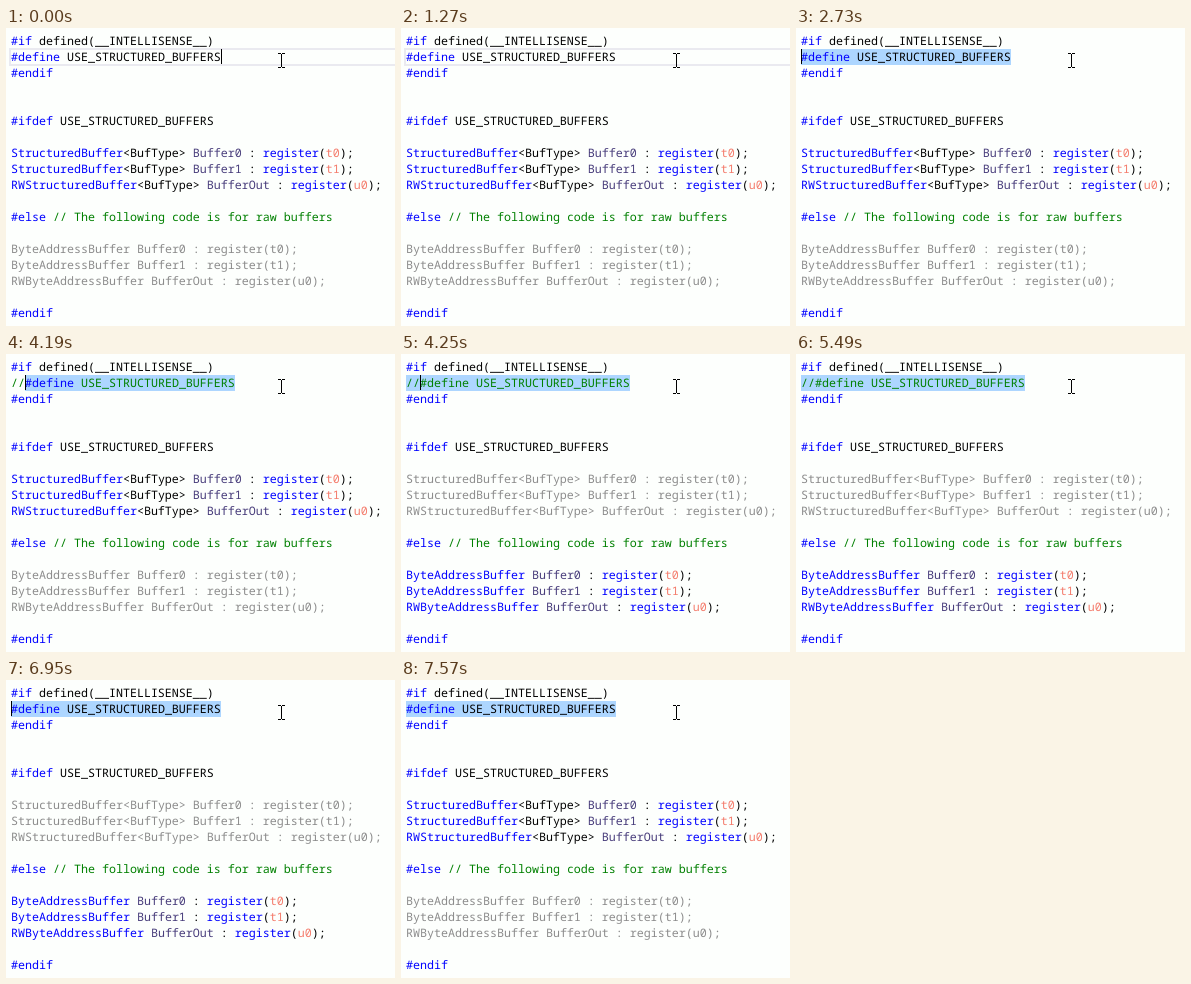
These frames come from a looping animation (389x298 px, 8000 ms). An HTML page:

```html
<!DOCTYPE html>
<html lang="en">
<head>
<meta charset="utf-8">
<title>Preprocessor toggle</title>
<style>
  html, body { margin: 0; width: 100%; height: 100%; overflow: hidden; background: #fdfffd; }
  svg { display: block; width: 389px; height: 298px; }
  text {
    font: 11.667px "Noto Sans Mono", "DejaVu Sans Mono", monospace;
    white-space: pre;
    text-rendering: geometricPrecision;
  }
  .keyword { fill: #0000ff; }
  .variable { fill: #483d7b; }
  .slot { fill: #f47c6c; }
  .comment { fill: #008000; }
  .inactive, .inactive tspan { fill: #8c8c8c; }
</style>
</head>
<body>
<svg id="stage" viewBox="0 0 389 298">
  <rect id="currentLine" x="4" y="21" width="400" height="16" fill="none" stroke="#eaeaf0" stroke-width="2"/>
  <rect id="selection" y="21" height="16" fill="#add6ff"/>
  <g id="code"></g>
  <rect id="caret" y="21" width="1" height="15" fill="#000"/>
  <path d="M272 25.5h3M276 25.5h3M275.5 26v13M272 39.5h3M276 39.5h3" fill="none" stroke="#000"/>
</svg>
<script>
const LOOP = 8000, LEFT = 5, CHAR = 7, LINE = 16, BASELINE = 17;
const DEFINE = "#define USE_STRUCTURED_BUFFERS";
const DEFINE_ROW = 1;

const source = [
  "#if defined(__INTELLISENSE__)",
  DEFINE,
  "#endif",
  "", "",
  "#ifdef USE_STRUCTURED_BUFFERS",
  "",
  "StructuredBuffer<BufType> Buffer0 : register(t0);",
  "StructuredBuffer<BufType> Buffer1 : register(t1);",
  "RWStructuredBuffer<BufType> BufferOut : register(u0);",
  "",
  "#else // The following code is for raw buffers",
  "",
  "ByteAddressBuffer Buffer0 : register(t0);",
  "ByteAddressBuffer Buffer1 : register(t1);",
  "RWByteAddressBuffer BufferOut : register(u0);",
  "",
  "#endif"
];
const structuredRows = [7, 8, 9], rawRows = [13, 14, 15];

const TOKENS = /(?<comment>\/\/.*)|(?<keyword>#\w+|register|(?:RW)?(?:Structured|ByteAddress)Buffer)|(?<variable>Buffer(?:\d|Out))|(?<slot>[tu]\d(?=\)))/g;

// Editor states; columns count characters from the left margin.
const phases = [
  { at: 0, caret: 30, look: "code", structured: true },
  { at: 2730, caret: 0, select: [0, 30], look: "code", structured: true },
  { at: 4190, caret: 2, select: [2, 32], look: "mixed", slashes: true, structured: true },
  { at: 4250, caret: 2, select: [0, 32], look: "comment", slashes: true, structured: false },
  { at: 6830, caret: 0, select: [0, 30], look: "comment", structured: false },
  { at: 6950, caret: 0, select: [0, 30], look: "code", structured: false },
  { at: 7040, caret: 0, select: [0, 30], look: "code", structured: true }
];
const caretOff = [[180, 740], [1270, 1770], [2330, 2730], [3350, 3910],
  [4400, 4960], [5490, 5990], [6490, 6830], [7570, LOOP]];

const byId = id => document.getElementById(id);
const currentLine = byId("currentLine"), selection = byId("selection"), caret = byId("caret");
const columnX = column => LEFT + column * CHAR;
const escapeText = s => s.replace(/&/g, "&amp;").replace(/</g, "&lt;");
const span = (kind, s) => `<tspan class="${kind}">${escapeText(s)}</tspan>`;

function highlight(line) {
  let html = "", end = 0;
  for (const match of line.matchAll(TOKENS)) {
    const kind = Object.keys(match.groups).find(name => match.groups[name]);
    html += escapeText(line.slice(end, match.index)) + span(kind, match[0]);
    end = match.index + match[0].length;
  }
  return html + escapeText(line.slice(end));
}

byId("code").innerHTML = source.map((line, row) =>
  `<text x="${LEFT}" y="${BASELINE + row * LINE}">${highlight(line)}</text>`).join("");
const rows = [...document.querySelectorAll("text")];

function defineMarkup({ look, slashes }) {
  const text = (slashes ? "//" : "") + DEFINE;
  if (look === "comment") return span("comment", text);
  if (look === "mixed") {
    return span("comment", "//") + span("keyword", "#define") + span("comment", DEFINE.slice(7));
  }
  return highlight(text);
}

function setInactive(indices, inactive) {
  for (const i of indices) rows[i].classList.toggle("inactive", inactive);
}

let shown;
function enter(phase) {
  shown = phase;
  const [from, to] = phase.select || [0, 0];
  selection.setAttribute("x", columnX(from));
  selection.setAttribute("width", (to - from) * CHAR);
  currentLine.style.display = phase.select ? "none" : "";
  caret.setAttribute("x", columnX(phase.caret));
  rows[DEFINE_ROW].innerHTML = defineMarkup(phase);
  setInactive(structuredRows, !phase.structured);
  setInactive(rawRows, phase.structured);
}

function render(time) {
  const phase = phases.findLast(p => p.at <= time);
  if (phase !== shown) enter(phase);
  const hidden = caretOff.some(([from, to]) => time >= from && time < to);
  caret.style.display = hidden ? "none" : "";
}

let start;
function tick(now) {
  start ??= now;
  render(Math.max(0, now - start) % LOOP);
  requestAnimationFrame(tick);
}
render(0);
requestAnimationFrame(tick);
</script>
</body>
</html>
```
